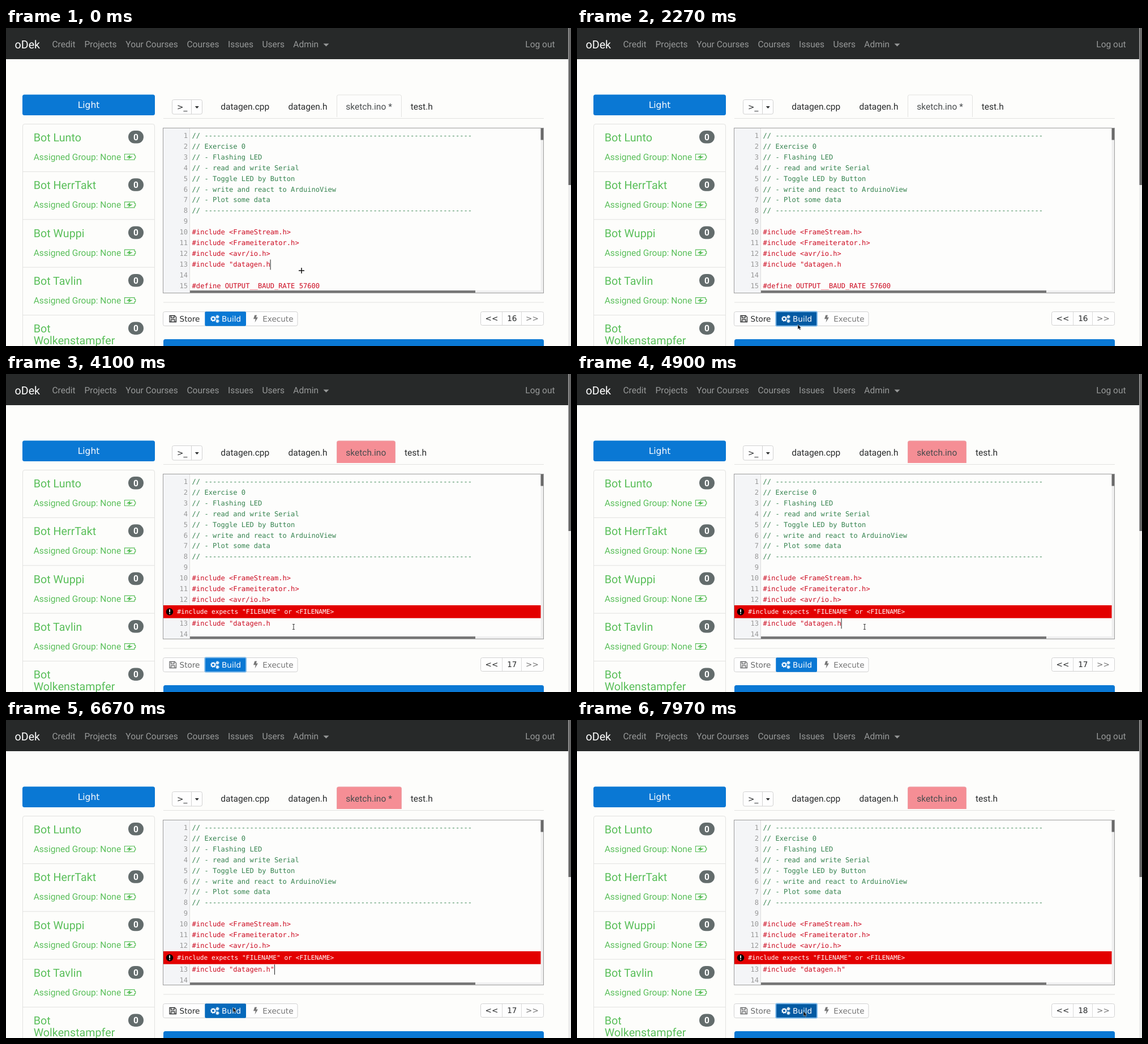
Animation of 998x561 px, one loop 8000 ms. Source, as an HTML page:

```html
<!DOCTYPE html>
<html lang="en">
<head>
<meta charset="utf-8">
<title>Course editor</title>
<style>
html, body { margin: 0; width: 100%; height: 100%; overflow: hidden; background: #fdfdfb; }
svg { display: block; width: 100%; height: 100%; }
text { font-family: Roboto, sans-serif; font-size: 15.55px; fill: #292b2c; text-rendering: geometricPrecision; }
.big { font-size: 19.7px; }
.ui { font-family: "DejaVu Sans", sans-serif; font-size: 13.6px; }
.mono { font-family: "DejaVu Sans Mono", monospace; font-size: 12.08px; }
.line { fill: none; stroke: #e2e2e0; }
.box { fill: #fefefe; stroke: #d2d2d2; }
</style>
</head>
<body>
<svg id="stage" viewBox="0 0 998 561"></svg>
<script>
const BLUE = '#0a78d4', GREEN = '#5abf5a', RED = '#cc0a20', COMMENT = '#35834f';
const PITCH = 18.98, ROW = 84.35;

const esc = s => s.replace(/&/g, '&amp;').replace(/</g, '&lt;');
const text = (x, y, s, cls = '', fill = '#292b2c', extra = '') =>
  `<text x="${x}" y="${y}" class="${cls}" style="fill:${fill}" ${extra}>${esc(s)}</text>`;
const rect = (x, y, w, h, fill, extra = '') =>
  `<rect x="${x}" y="${y}" width="${w}" height="${h}" fill="${fill}" ${extra}/>`;
const box = (x, y, w, h, r = 3) =>
  `<rect class="box" x="${x}" y="${y}" width="${w}" height="${h}" rx="${r}"/>`;
const path = (d, extra = 'class="line"') => `<path d="${d}" ${extra}/>`;

function navbar() {
  const links = [['Credit', 81.5], ['Projects', 138.5], ['Your Courses', 211.3], ['Courses', 319.5],
    ['Issues', 392], ['Users', 452.5], ['Admin', 507.3], ['Log out', 917.3]];
  return rect(0, 0, 993, 55, '#272929') + text(15.5, 36, 'oDek', 'big', '#fff') +
    links.map(([s, x]) => text(x, 34, s, '', '#979999')).join('') +
    path('M560.5 27.5h10l-5 5z', 'fill="#979999"') +
    rect(993, 0, 5, 561, '#ededed') + rect(993.5, 0, 4.5, 277, '#686868');
}

function sidebar() {
  const bots = ['Bot Lunto', 'Bot HerrTakt', 'Bot Wuppi', 'Bot Tavlin', 'Bot'];
  let out = rect(29, 117.5, 234, 36.5, BLUE, 'rx="3.5"') +
    text(146, 141, 'Light', 'ui', '#fff', 'text-anchor="middle" font-size="15.5" id="light"') +
    `<rect class="line" x="29.5" y="169.5" width="233" height="420" rx="3.5"/>`;
  bots.forEach((name, i) => {
    const dy = i * ROW;
    out += `<g transform="translate(0 ${dy})">` +
      (i ? path('M30 169.1H262') : '') + text(48.7, 200, name, 'big', GREEN) +
      rect(216, 181, 27, 22.5, '#636c6c', 'rx="11.2"') +
      text(229.5, 197.7, '0', '', '#fff', 'text-anchor="middle" font-weight="700"');
    if (i < 4) out += text(48.7, 233, 'Assigned Group: None', '', GREEN) +
      path('M214 222.5H209.5V232.5H214M223 222.5H227V225.5H228.7V229.5H227V232.5H220',
        `fill="none" stroke="${GREEN}" stroke-width="1.2"`) +
      path('M214 222.5H223M214 232.5H220', `stroke="${GREEN}" stroke-width="1.2"`) +
      path('M219.5 223.5L212.5 228.5H217L216 231.8L224 226.8H219z', `fill="${GREEN}"`);
    out += '</g>';
  });
  return out + text(48.7, 558.3, 'Wolkenstampfer', 'big', GREEN);
}

function tabs() {
  return box(293.5, 126.5, 53, 25.5) + path('M327.5 127V152', 'stroke="#d2d2d2"') +
    text(302, 143.5, '>_', 'ui') + path('M333.8 138h7l-3.5 4z', 'fill="#292b2c"') +
    path('M278 159.5H950') +
    text(379.3, 143.8, 'datagen.cpp') + text(498.5, 143.8, 'datagen.h') +
    '<path id="tab"/>' + text(600.2, 143.8, '', '', '#484c4e', 'id="tabName"') +
    text(0, 143.8, 'test.h', '', '#292b2c', 'id="lastTab"');
}

function editor() {
  const rule = '// ' + '-'.repeat(65);
  const code = [rule, '// Exercise 0', '// - Flashing LED', '// - read and write Serial',
    '// - Toggle LED by Button', '// - write and react to ArduinoView', '// - Plot some data', rule, '',
    '#include <FrameStream.h>', '#include <Frameiterator.h>', '#include <avr/io.h>',
    '#include "datagen.h', '', '#define OUTPUT__BAUD_RATE 57600'];
  const line = (s, i) => {
    const y = 193.6 + i * PITCH;
    return text(321, y, String(i + 1), 'mono', '#999', 'text-anchor="end"') +
      text(328.6, y, s, 'mono', s[0] === '#' ? RED : COMMENT, i === 12 ? 'id="include"' : '');
  };
  const lines = code.map(line);
  return '<clipPath id="view"><rect x="278" y="177" width="671" height="286.5"/></clipPath>' +
    rect(277.5, 176.5, 672, 291, '#fdfdfc') + rect(278, 177, 46.5, 290, '#f4f5f7') +
    path('M324.5 177V467', 'stroke="#dcdcdc"') +
    '<g clip-path="url(#view)">' + lines.slice(0, 12).join('') +
    '<g id="tail">' + lines.slice(12).join('') + rect(0, 408.5, 1, 18, '#222', 'id="caret"') + '</g>' +
    '<g id="error">' + rect(278, 408, 667, 22.7, '#e30000') +
    '<circle cx="289" cy="419.5" r="6.2"/>' + rect(288.2, 415.3, 1.8, 5, '#fff') + rect(288.2, 421.6, 1.8, 1.8, '#fff') +
    text(302.3, 423.3, '#include expects "FILENAME" or <FILENAME>', 'mono', '#fff', 'id="message"') + '</g></g>' +
    rect(944.5, 177, 4.5, 290, '#efefef') + rect(944.5, 177, 4.5, 20.5, '#6a6a6a') +
    rect(325, 463, 620, 4, '#efefef') + rect(325, 463, 504, 4, '#777') +
    rect(277.5, 176.5, 672, 291, 'none', 'stroke="#9c9c9c"');
}

function gear(x, y, r) {
  return `<g fill="none" stroke="#fff"><circle cx="${x}" cy="${y}" r="${r}" stroke-width="1.8"/>` +
    `<circle cx="${x}" cy="${y}" r="${r + 1.3}" stroke-width="1.3" stroke-dasharray="${(r + 1.3) * Math.PI / 8}"/></g>`;
}

function toolbar() {
  return path('M278 484H950') + box(277.5, 500.5, 237.5, 25) +
    '<g id="store">' + path('M289 507.5H298L300.5 510V518.5H289zM291.5 507.5V511.5H297V507.5M291.5 518.5V514.5H298V518.5',
      'fill="none" stroke="#292b2c" stroke-width="1.3"') + text(306.5, 518, 'Store', 'ui') + '</g>' +
    rect(351.3, 500.3, 72.7, 25.4, BLUE, 'id="build" rx="2"') +
    gear(366, 513, 3) + gear(373.5, 509.5, 1.3) + gear(373.5, 517, 1.3) +
    text(381, 518, 'Build', 'ui', '#fff') +
    path('M439.3 506.5H443L441.8 510.5H445L439.5 519.5L440.8 513.3H437z', 'fill="#777"') +
    text(453.2, 518, 'Execute', 'ui', '#777') +
    box(838.5, 500.5, 111, 24) + path('M876.5 501V524M910.5 501V524', 'stroke="#dadada"') +
    text(846.5, 517.4, '<<', 'ui') + text(893.8, 517.4, '', 'ui', '#292b2c', 'text-anchor="middle" id="count"') +
    text(918, 517.4, '>>', 'ui', '#777') +
    rect(278, 549, 672, 30, BLUE, 'rx="3.5"');
}

const pointer = '<g id="cross">' + path('M-5 0H5M0 -5V5', 'stroke="#fff" stroke-width="3.4"') +
  path('M-5 0H5M0 -5V5', 'stroke="#111" stroke-width="1.5"') + '</g>' +
  path('M-2 -4.5H2M0 -4.5V4.5M-2 4.5H2', 'id="beam" stroke="#444" stroke-width="1.1"') +
  path('M0 0V8.5L2 6.8L3.5 9.8L5 9L3.6 6.2H6z', 'id="arrow" fill="#111" stroke="#ddd" stroke-width=".5"');

const stage = document.getElementById('stage');
stage.innerHTML = navbar() + sidebar() + tabs() + editor() + toolbar() + `<g id="pointer">${pointer}</g>`;
const $ = id => document.getElementById(id);
$('light').style.fontSize = '15.5px';
$('message').style.fontSize = '11.22px';

// Pointer stops: time, x, y
const stops = [[0, 522, 428], [770, 522, 428], [1130, 402, 511], [1330, 394, 520], [2070, 394, 520], [2200, 390, 523],
  [3630, 390, 523], [4060, 508, 446], [6170, 508, 446], [6670, 401, 507], [6900, 400, 514], [8000, 400, 514]];
const within = (t, ...spans) => spans.some(([a, b]) => t >= a && t < b);
const clamp = v => Math.max(0, Math.min(1, v));
const show = (id, on) => $(id).setAttribute('visibility', on ? 'visible' : 'hidden');

function position(t) {
  const i = stops.findIndex(s => s[0] > t);
  const [t0, x0, y0] = stops[i - 1], [t1, x1, y1] = stops[i];
  let k = (t - t0) / (t1 - t0);
  k = k * k * (3 - 2 * k);
  return [x0 + (x1 - x0) * k, y0 + (y1 - y0) * k];
}

function draw(t) {
  const saved = within(t, [2800, 5570], [7700, 8000]);
  const failed = t >= 2970;
  const typed = t >= 5570;

  const right = saved ? 687.5 : 698.5;
  $('tab').setAttribute('d', `M584.5 157V121q0-3 3-3H${right - 3}q3 0 3 3V157`);
  $('tab').setAttribute('fill', failed ? '#f58e95' : '#fdfdfc');
  $('tab').setAttribute('stroke', failed ? '#eba4a8' : '#e2e2e0');
  $('tabName').textContent = saved ? 'sketch.ino' : 'sketch.ino *';
  $('lastTab').setAttribute('x', saved ? 704 : 714.7);

  show('error', failed);
  $('tail').setAttribute('transform', `translate(0 ${failed ? 22.8 : 0})`);
  $('include').textContent = '#include "datagen.h' + (typed ? '"' : '');
  $('caret').setAttribute('x', typed ? 474 : 466.6);
  show('caret', within(t, [0, 100], [630, 1130], [1700, 2070], [4470, 5000], [5530, 6130], [6660, 7100]));

  const hover = clamp((t - 1030) / 200) - clamp((t - 3680) / 200) + clamp((t - 6570) / 200);
  const mix = (a, b) => Math.round(a + (b - a) * hover);
  $('build').setAttribute('fill', `rgb(${mix(10, 3)},${mix(120, 90)},${mix(212, 163)})`);
  const focused = within(t, [2100, 4470], [7100, 8000]);
  $('build').setAttribute('stroke', focused ? '#7fb9e8' : 'none');
  $('build').setAttribute('stroke-width', 2);
  $('store').setAttribute('opacity', saved ? .7 : 1);
  $('count').textContent = t < 2800 ? '16' : t < 7700 ? '17' : '18';

  const [x, y] = position(t);
  $('pointer').setAttribute('transform', `translate(${x} ${y})`);
  show('cross', t < 770);
  show('beam', t >= 770 && y < 468);
  show('arrow', y >= 468);
}

function tick() {
  draw(performance.now() % 8000);
  requestAnimationFrame(tick);
}
tick();
</script>
</body>
</html>
```
